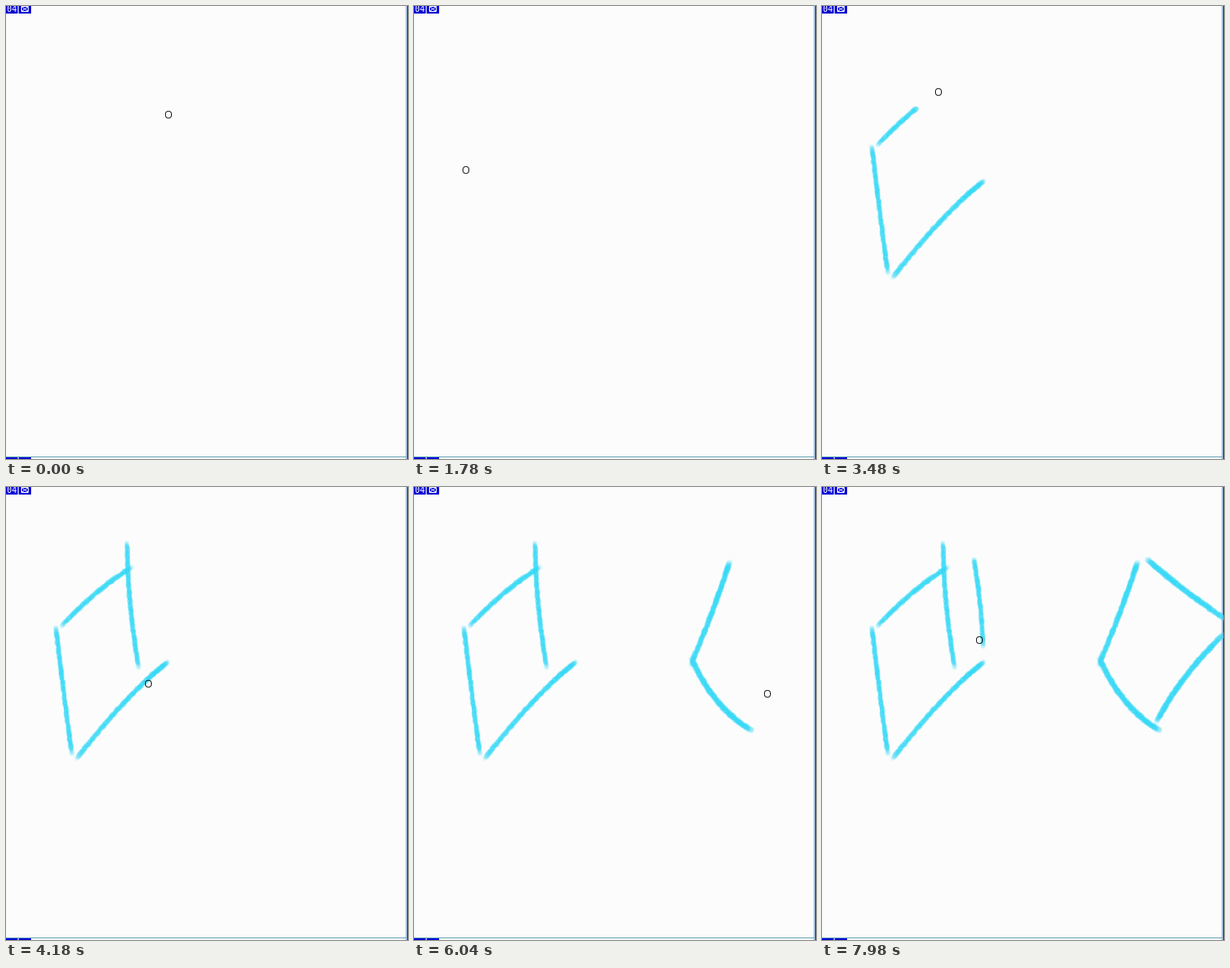
An HTML page with a canvas for the animation above (8 s loop, 480 px wide and 540 px high).

```html
<!DOCTYPE html>
<html lang="en">
<head>
<meta charset="utf-8">
<title>Sketching</title>
<style>
  html, body { margin: 0; width: 100%; height: 100%; overflow: hidden; background: #fcfcfc; }
  canvas { position: absolute; left: 0; top: 0; width: 480px; height: 540px; }
  .tag {
    position: absolute; top: 0; left: 0; width: 14px; height: 9px; overflow: hidden;
    background: #0404d4; color: #fff; text-align: center;
    font: 10px/8px "DejaVu Sans Mono", monospace;
  }
  .mail { left: 15px; width: 15px; }
  .mail svg { display: block; }
  .low { top: 538px; height: 2px; }
</style>
</head>
<body>
<canvas id="stage" width="480" height="540"></canvas>
<div class="tag">04</div>
<div class="tag mail">
  <svg width="15" height="9" fill="none" stroke="#fff">
    <path d="M3.5 .5h8v6h-8zM4 1l7 5M11 1L4 6"/>
  </svg>
</div>
<div class="tag low"></div>
<div class="tag mail low"></div>
<script>
const LOOP = 8000, LAG = 70;
const ctx = document.getElementById('stage').getContext('2d');

// Pen strokes: start and end in ms, width, then first, middle and last point
const strokes = [
  [2140, 2340, 5.6, [59, 167], [68, 241], [78, 318]],
  [2600, 2850, 6, [84, 323], [143, 254], [193, 208]],
  [3280, 3510, 6, [66, 165], [107, 126], [150, 95]],
  [3800, 4080, 5.6, [144, 66], [148, 141], [158, 215]],
  [5140, 5330, 6.4, [376, 90], [356, 147], [330, 212]],
  [5520, 5750, 6.8, [331, 204], [362, 255], [403, 290]],
  [6270, 6480, 6.8, [399, 279], [434, 225], [479, 175]],
  [6690, 6880, 7, [388, 86], [432, 122], [481, 157]],
  [7640, 7860, 5.6, [181, 85], [188, 137], [192, 190]]
].map(([from, to, width, ...pts]) => ({ from, to, width, pts }));

// Places the cursor visits between strokes: time, x, y
const stops = [
  [0, 194, 129], [200, 196, 116], [820, 88, 178], [1120, 75, 198],
  [1500, 57, 149], [1700, 63, 206], [1920, 59, 170],
  [2460, 75, 287], [2920, 203, 200], [3700, 144, 64],
  [4140, 162, 237], [4420, 298, 180], [4600, 272, 168], [5020, 360, 123],
  [5960, 427, 240], [7060, 388, 161], [7440, 122, 98],
  [7900, 192, 198], [7980, 188, 182]
];

// Parabola through three points, the middle one at u = .5
const curve = ([a, b, c], u) => [0, 1].map(k =>
  a[k] * (1 - u) * (1 - 2 * u) + b[k] * 4 * u * (1 - u) + c[k] * u * (2 * u - 1));

function random(seed) {
  return () => (seed = (seed * 16807) % 2147483647) / 2147483647;
}

// Soft, slightly grainy dabs along each stroke
const rnd = random(71);
for (const s of strokes) {
  const [a, , c] = s.pts;
  const len = Math.hypot(c[0] - a[0], c[1] - a[1]), n = Math.round(len / .6);
  s.dabs = Array.from({ length: n + 1 }, (_, i) => {
    const u = i / n, [x, y] = curve(s.pts, u);
    const jitter = size => (rnd() - .5) * size + .5;
    return {
      u,
      ink: Math.min(1, .3 + u * len / 9, .2 + (1 - u) * len / 11),
      x: x + jitter(1.4), y: y + jitter(1.4),
      r: s.width * (.38 + rnd() * .2),
      grain: rnd() < .3,
      gx: x + jitter(s.width), gy: y + jitter(s.width)
    };
  });
}

// Each leg of the cursor's way: a stroke, or an eased glide between neighbours
const spots = [
  ...stops.map(([t, ...p]) => ({ from: t, to: t, pts: [p, p, p] })),
  ...strokes
].sort((a, b) => a.from - b.from);

function cursorAt(t) {
  const i = spots.findLastIndex(s => s.from <= t), a = spots[i], b = spots[i + 1];
  if (t < a.to) return curve(a.pts, (t - a.from) / (a.to - a.from));
  if (!b) return a.pts[2];
  const f = (t - a.to) / (b.from - a.to), e = f * f * (3 - 2 * f);
  return a.pts[2].map((v, k) => v + (b.pts[0][k] - v) * e);
}

function dot(x, y, r, alpha, color) {
  ctx.globalAlpha = alpha;
  ctx.fillStyle = color;
  ctx.beginPath();
  ctx.arc(x, y, r, 0, 7);
  ctx.fill();
}

function rect(color, x, y, w, h) {
  ctx.fillStyle = color;
  ctx.fillRect(x, y, w, h);
}

function draw(t) {
  ctx.globalAlpha = 1;
  rect('#fcfcfc', 0, 0, 480, 540);
  rect('#f2fafa', 0, 0, 1, 540);
  rect('#a8d0ec', 477, 0, 1, 540);
  rect('#a4b8d4', 478, 0, 1, 540);
  rect('#24384c', 479, 0, 1, 540);
  rect('#68a4b8', 0, 537, 478, 1);

  for (const s of strokes) {
    const done = (t - LAG - s.from) / (s.to - s.from);
    for (const d of s.dabs) {
      if (d.u > done) break;
      dot(d.x, d.y, d.r, .24 * d.ink, '#34d8f8');
      if (d.grain) dot(d.gx, d.gy, .7, .3, '#d8f6fc');
    }
  }

  const [x, y] = cursorAt(t).map(Math.round);
  ctx.globalAlpha = 1;
  ctx.strokeStyle = '#000';
  ctx.lineWidth = 1;
  ctx.beginPath();
  ctx.roundRect(x - 3.5, y - 3.5, 7, 8, 2.8);
  ctx.stroke();
}

function frame() {
  draw(Math.floor(performance.now() % LOOP / 20) * 20);
  requestAnimationFrame(frame);
}
frame();
</script>
</body>
</html>
```
